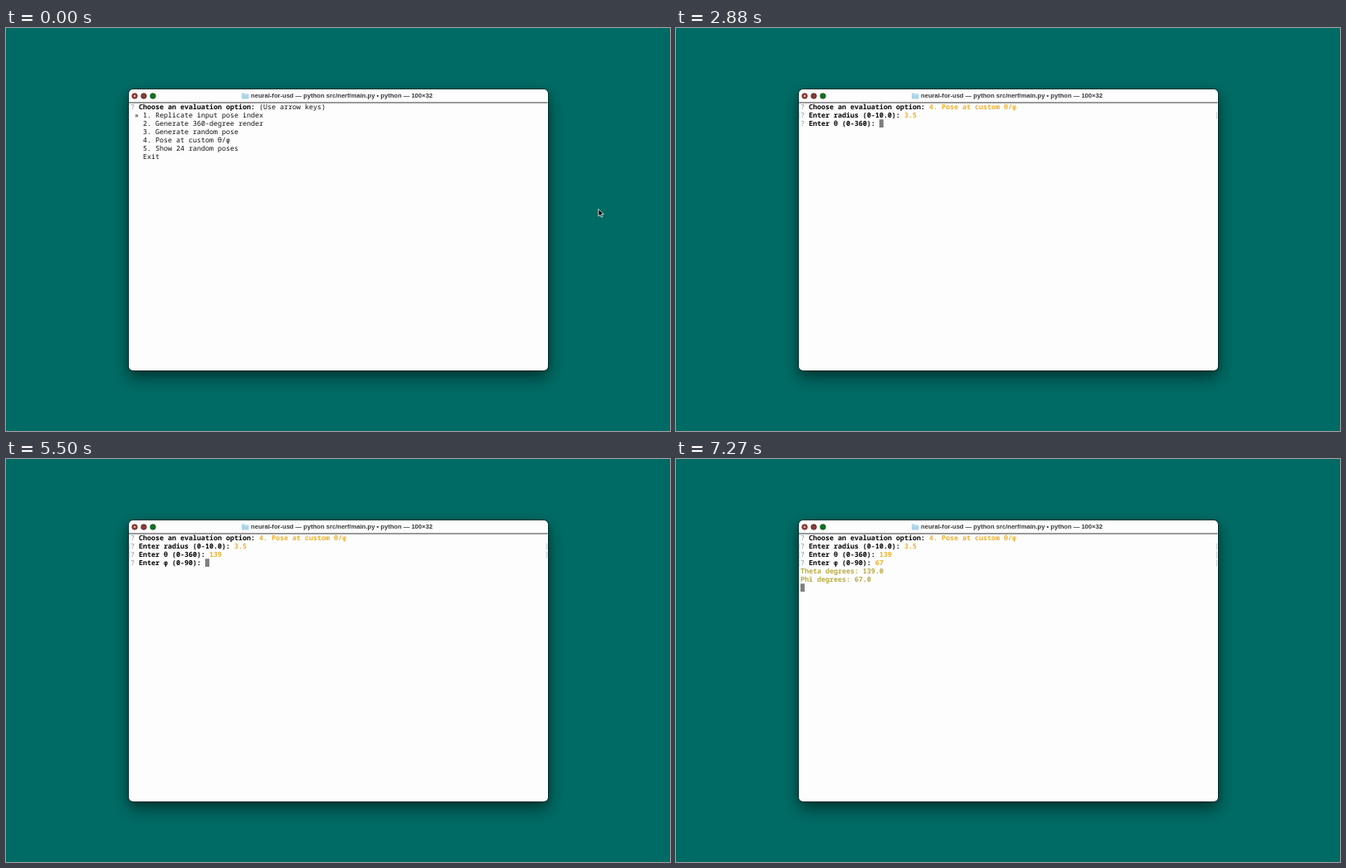
Recreate the animation shown at these times as an HTML page. Size 800 by 486 pixels, loop 8 s.

```html
<!DOCTYPE html>
<html lang="en">
<head>
<meta charset="utf-8">
<title>Pose evaluation terminal</title>
<style>
  html, body { margin: 0; width: 100%; height: 100%; overflow: hidden; background: #006b64; }
  svg { position: absolute; left: 0; top: 0; }
  .window {
    position: absolute; left: 147.5px; top: 74px; width: 505px; height: 338.5px;
    border-radius: 5px; background: #fdfdfd;
    box-shadow: 0 0 0 .7px rgba(0, 0, 0, .65), 0 9px 20px rgba(0, 0, 0, .46), 0 2px 8px rgba(0, 0, 0, .2);
  }
  .title { font: bold 7.6px "Liberation Sans", Arial, sans-serif; fill: #383838; }
  #term text {
    font: 500 8.333px "Noto Sans Mono", "DejaVu Sans Mono", monospace;
    white-space: pre; fill: #111; text-rendering: geometricPrecision;
  }
  #term .bold { font-weight: 700; fill: #000; }
  #term .mark { fill: #84939a; }
  #term .answer { font-weight: 600; fill: #edb02c; }
  #term .result { font-weight: 600; fill: #b7ac43; }
</style>
</head>
<body>
<div class="window"></div>
<svg width="800" height="486" viewBox="0 0 800 486">
  <path d="M147.5 90H652.5" stroke="#222" stroke-width=".9"/>
  <g stroke="#3a2020" stroke-width=".6">
    <circle cx="155" cy="82" r="3.3" fill="#a04038"/>
    <circle cx="166" cy="82" r="3.3" fill="#873c36"/>
    <circle cx="177" cy="82" r="3.3" fill="#0c7420" stroke="#0a3c12"/>
  </g>
  <circle cx="155" cy="82" r="1" fill="#f3dcd6"/>
  <path d="M284 78.5h3l1 1h4.5v6H284z" fill="#a9d3e6"/>
  <path d="M284 80.5h8.5" stroke="#c9e6f2" stroke-width=".7"/>
  <text class="title" x="404.5" y="84" text-anchor="middle">neural-for-usd — python src/nerf/main.py • python — 100×32</text>
  <g id="term"></g>
  <path id="mouse" d="M713.8 218.3v8.7l2-1.8 1.4 3 1.5-.7-1.3-2.9h2.7z" fill="#000" stroke="#fff" stroke-width=".8"/>
</svg>
<script>
const LOOP = 8000, CELL = 5, LINE = 10, LEFT = 150, TOP = 90;
const OPTIONS = ["1. Replicate input pose index", "2. Generate 360-degree render", "3. Generate random pose",
  "4. Pose at custom θ/ϕ", "5. Show 24 random poses", "Exit"];
const MOVES = [540, 1080, 1380];   // arrow key presses
const CHOSEN = 1740, RADIUS_DONE = 2640, THETA_DONE = 4640, PHI_ASKED = 5320, PHI_DONE = 6970;
const THETA_KEYS = [3520, 4340, 4580], PHI_KEYS = [6150, 6330];

const term = document.getElementById("term");
const mouse = document.getElementById("mouse");

const count = (times, t) => times.filter(k => t >= k).length;
const text = (col, row, str, cls = "") =>
  `<text x="${LEFT + col * CELL}" y="${TOP + row * LINE + 8.3}" class="${cls}">${str}</text>`;
const block = (col, row) =>
  `<rect x="${LEFT + col * CELL}" y="${TOP + row * LINE + .3}" width="5" height="9.7" fill="#808080"/>`;
const brackets = row => {
  const y = TOP + row * LINE + 2;
  return `<path d="M149.6 ${y}h-1.2v7h1.2M650.4 ${y}h1.2v7h-1.2" fill="none" stroke="#b8b8b8" stroke-width=".7"/>`;
};

function prompt(row, label, answer, done, active) {
  const col = label.length + 3;
  return text(0, row, "?", "mark") + text(2, row, label, "bold") + text(col, row, answer, "answer") +
    (done ? brackets(row) : "") + (active ? block(col + answer.length, row) : "");
}

function menu(t) {
  return text(31, 0, "(Use arrow keys)") + text(1, 1 + count(MOVES, t), "»") +
    OPTIONS.map((option, i) => text(3, i + 1, option)).join("");
}

function screen(t) {
  const head = text(0, 0, "?", "mark") + text(2, 0, "Choose an evaluation option:", "bold");
  if (t < CHOSEN) return head + menu(t);
  let out = head + text(31, 0, OPTIONS[3], "answer");
  out += prompt(1, "Enter radius (0-10.0):", "3.5", t >= RADIUS_DONE, t < RADIUS_DONE);
  if (t >= RADIUS_DONE)
    out += prompt(2, "Enter θ (0-360):", "139".slice(0, count(THETA_KEYS, t)), t >= THETA_DONE, t < PHI_ASKED);
  if (t >= PHI_ASKED)
    out += prompt(3, "Enter ϕ (0-90):", "67".slice(0, count(PHI_KEYS, t)), t >= PHI_DONE, t < PHI_DONE);
  if (t >= PHI_DONE)
    out += text(0, 4, "Theta degrees: 139.0", "result") + text(0, 5, "Phi degrees: 67.0", "result") + block(0, 6);
  return out;
}

let shown = "", start;
function frame(now) {
  start ??= now;
  const t = (now - start) % LOOP, next = screen(t);
  if (next !== shown) term.innerHTML = shown = next;
  mouse.style.display = t < MOVES[0] ? "" : "none";
  requestAnimationFrame(frame);
}
requestAnimationFrame(frame);
</script>
</body>
</html>
```
